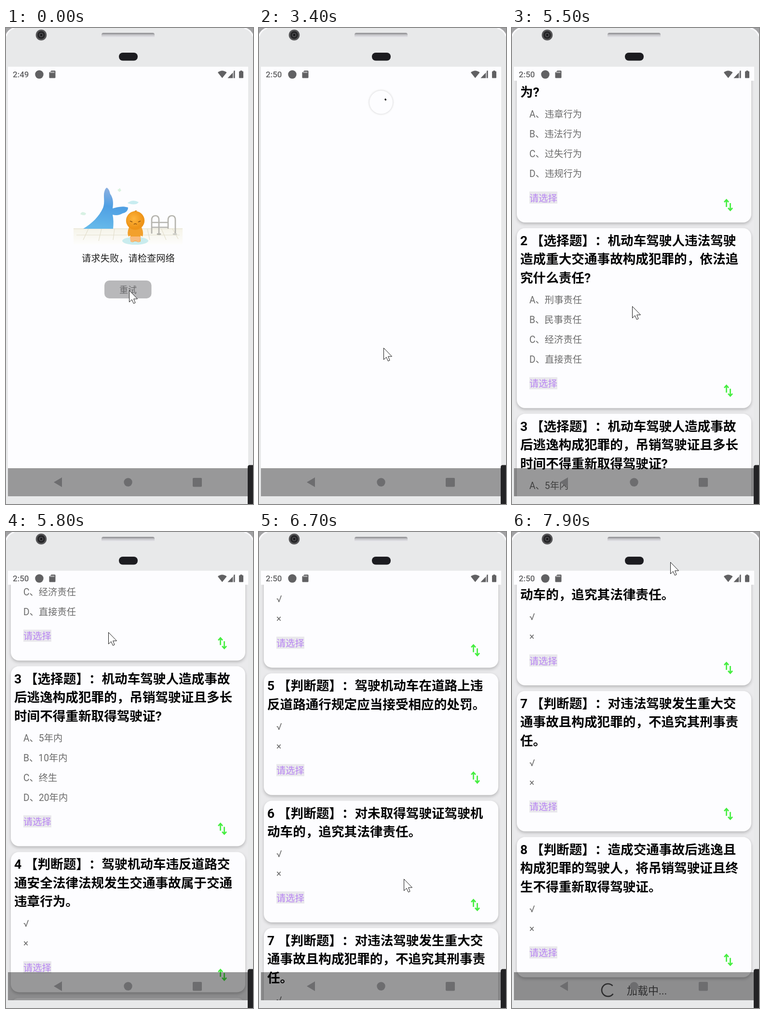
An HTML page that plays this animation: 512x984 px, repeating every 8000 ms.

```html
<!DOCTYPE html>
<html lang="zh-CN">
<head>
<meta charset="utf-8">
<title>答题列表</title>
<style>
html, body { margin: 0; width: 100%; height: 100%; overflow: hidden; background: #e8e9ea; }
svg { display: block; width: 100vw; height: 100vh; text-spacing-trim: space-all;
  font-family: Roboto, "Noto Sans CJK SC", "Noto Sans CJK", sans-serif; }
text { white-space: pre; }
.title { font-size: 26.6px; font-weight: 700; fill: #030304; }
.option { font-size: 19.3px; fill: #6b6b6b; }
.pick { font-size: 19.3px; fill: #b784f2; }
.card { fill: #fdfdff; filter: drop-shadow(0 3px 3px rgba(0, 0, 0, .22)); }
</style>
</head>
<body>
<svg id="stage" viewBox="0 0 512 984" preserveAspectRatio="none">
  <defs>
    <linearGradient id="speaker" x2="0" y2="1">
      <stop offset="0" stop-color="#858588"/><stop offset=".45" stop-color="#c6c6ca"/><stop offset="1" stop-color="#ececf0"/>
    </linearGradient>
    <linearGradient id="tail" x1=".6" x2=".45" y2="1">
      <stop offset="0" stop-color="#8fb0e0"/><stop offset=".45" stop-color="#4f9fe3"/><stop offset="1" stop-color="#65b9ea"/>
    </linearGradient>
    <radialGradient id="skin" cx=".42" cy=".4">
      <stop offset="0" stop-color="#ffb53c"/><stop offset="1" stop-color="#ee9418"/>
    </radialGradient>
    <linearGradient id="floor" x2="0" y2="1">
      <stop offset="0" stop-color="#f5f3e8"/><stop offset="1" stop-color="#fdfdfc"/>
    </linearGradient>
    <clipPath id="listClip"><rect x="4" y="109" width="498" height="859"/></clipPath>
  </defs>

  <rect width="512" height="984" fill="#e8e9ea"/>
  <path d="M0 0H17Q4 4 0 17ZM512 0H494Q508 4 512 17Z" fill="#a2a2a4"/>
  <path d="M0 17Q4 4 17 0M512 17Q508 4 494 0" fill="none" stroke="#f8f8fa" stroke-width="3"/>
  <circle cx="73" cy="14.500" r="11.300" fill="#555557"/>
  <circle cx="73" cy="14.500" r="8" fill="#252527"/>
  <circle cx="73" cy="14.500" r="4.500" fill="#48484b"/>
  <circle cx="73" cy="14.500" r="2.200" fill="#111113"/>
  <path d="M198 20V14Q198 10 202 10H304Q308 10 308 14V20Z" fill="url(#speaker)"/>
  <rect x="234" y="51" width="39" height="16.500" rx="8" fill="#1c1c20"/>
  <rect x="4" y="80" width="498" height="888" fill="#fdfdff"/>

  <g id="errorView">
    <rect x="140" y="414" width="226" height="33" fill="url(#floor)"/>
    <path d="M140 415H366M146 428H360M171 415L160 438M198 415L192 440M225 415L222 438M293 415L298 438M322 415L332 438M345 415L357 436" fill="none" stroke="#e3dfcd" stroke-width="1.200"/>
    <path d="M160 415C178 404 193 390 201 372C206 360 201 347 204 338Q206 331 209 330Q214 333 216 343C222 351 223 361 221 373C230 371 240 367 253 371C253 378 248 382 242 383C235 387 229 388 221 386C223 395 223 405 222 415Z" fill="url(#tail)"/>
    <path d="M252 362Q262 353 275 360Q270 368 252 362Z" fill="#c8ecf0"/>
    <path d="M231 335L236 331L239 336L235 339Z" fill="#d9f1df"/>
    <path d="M154 385Q157 377 166 383Q165 390 154 385Z" fill="#d8f1e4"/>
    <ellipse cx="268" cy="440" rx="27" ry="8" fill="#c9ecee"/>
    <path d="M302 425V397Q302 388 310 388Q317 388 317 397V426M336 415V397Q336 388 344 388Q351 388 351 397V426M302 402H336M302 412H336" fill="none" stroke="#b5b4ae" stroke-width="2.700"/>
    <ellipse cx="317" cy="426" rx="4.500" ry="2" fill="#b5b4ae"/>
    <ellipse cx="350" cy="426" rx="4.500" ry="2" fill="#cfcec8"/>
    <path d="M255 412Q250 424 254 431L258 429V441Q262 444 266 441H270Q275 444 279 441V429L283 431Q286 423 281 412Z" fill="#f2a02c"/>
    <path d="M257 431H279L278 441Q274 444 270 440H266Q262 444 258 441Z" fill="#f9bb7c"/>
    <path d="M265 381Q266 377 271 377L270 382Z" fill="#d77f12"/>
    <circle cx="268" cy="398" r="19.200" fill="url(#skin)"/>
    <path d="M257 399L262 401M274 401L279 399M265 406Q268 403 271 406" fill="none" stroke="#8c5210" stroke-width="1.500"/>
    <text x="253.500" y="482.500" text-anchor="middle" font-size="19.300" fill="#202020">请求失败，请检查网络</text>
    <rect x="204" y="522" width="97.500" height="37" rx="10" fill="#b8b8ba"/>
    <text x="253" y="547.500" text-anchor="middle" font-size="18" fill="#69696b">重试</text>
  </g>

  <g id="list" clip-path="url(#listClip)">
    <rect x="4" y="109" width="498" height="859" fill="#eaeaec"/>
    <g id="content"></g>
  </g>

  <g id="refresh">
    <circle r="27.500" fill="#f4f4f5" opacity=".65"/>
    <circle r="25.500" fill="#e9e9eb"/>
    <circle r="24" fill="#fdfdff"/>
    <path id="refreshArc" fill="none" stroke="#060607" stroke-width="3" stroke-linecap="square"/>
  </g>

  <rect x="4" y="80" width="498" height="29" fill="#fdfdff"/>
  <g fill="#616163">
    <text id="clock" x="14" y="102" font-size="17" font-weight="500"></text>
    <circle cx="69" cy="96" r="8.700"/>
    <path d="M94 88H101Q102.500 88 102.500 89.500V102Q102.500 103.500 101 103.500H91Q89.500 103.500 89.500 102V92.500Z"/>
    <path d="M439 92Q448 84.500 457.500 92L448.200 103.500Z"/>
    <path d="M459.500 103.500L474.500 88V103.500Z" opacity=".3"/>
    <path d="M459.500 103.500L470 92.500V103.500ZM472 88.500L474.500 88V103.500H472Z"/>
    <path d="M485.500 88H489.500V89.500H491Q492 89.500 492 90.500V102.500Q492 103.500 491 103.500H484Q483 103.500 483 102.500V90.500Q483 89.500 484 89.500H485.500Z"/>
    <path d="M93 90V93M96 90V93M99 90V93" stroke="#fdfdff" stroke-width="1.300"/>
  </g>

  <rect x="4" y="910" width="498" height="58" fill="#000" fill-opacity=".4"/>
  <g fill="#6d6d6f">
    <path d="M99 939L116 929V949Z"/>
    <circle cx="253" cy="939" r="8.700"/>
    <rect x="387" y="930" width="19" height="18.500" rx="2"/>
  </g>
  <path d="M512 903.500H505Q501 903.500 501 908V984H512Z" fill="#232325"/>
  <path id="cursor" d="M.5 .5V24.500L6 19.500L9.500 27.500L13 26L9.700 18H17.500Z" fill="#fff" stroke="#151516"/>
</svg>

<script>
const LOOP = 8000, STEP = 100, TURN = 1332;
const LINE = 38.5, ROW = 41, GAP = 11.8;
const $ = id => document.getElementById(id);
const clamp = v => Math.max(0, Math.min(1, v));

const judge = ['√', '×'];
const questions = [
  [['1 【选择题】：驾驶机动车在道路上违', '反道路交通安全法的行为，属于什么行', '为?'],
    ['A、违章行为', 'B、违法行为', 'C、过失行为', 'D、违规行为']],
  [['2 【选择题】：机动车驾驶人违法驾驶', '造成重大交通事故构成犯罪的，依法追', '究什么责任?'],
    ['A、刑事责任', 'B、民事责任', 'C、经济责任', 'D、直接责任']],
  [['3 【选择题】：机动车驾驶人造成事故', '后逃逸构成犯罪的，吊销驾驶证且多长', '时间不得重新取得驾驶证?'],
    ['A、5年内', 'B、10年内', 'C、终生', 'D、20年内']],
  [['4 【判断题】：驾驶机动车违反道路交', '通安全法律法规发生交通事故属于交通', '违章行为。'], judge],
  [['5 【判断题】：驾驶机动车在道路上违', '反道路通行规定应当接受相应的处罚。'], judge],
  [['6 【判断题】：对未取得驾驶证驾驶机', '动车的，追究其法律责任。'], judge],
  [['7 【判断题】：对违法驾驶发生重大交', '通事故且构成犯罪的，不追究其刑事责', '任。'], judge],
  [['8 【判断题】：造成交通事故后逃逸且', '构成犯罪的驾驶人，将吊销驾驶证且终', '生不得重新取得驾驶证。'], judge]
];

const label = (cls, x, y, s) => `<text class="${cls}" x="${x}" y="${y}">${s}</text>`;

function card([lines, options], top) {
  const height = 92.5 + LINE * lines.length + ROW * options.length;
  const first = 32.5 + LINE * lines.length;
  const pick = first + ROW * (options.length - 1) + 50.5;
  const svg = `<g transform="translate(0 ${top})">
    <rect class="card" x="10" width="486" height="${height}" rx="17"/>
    ${lines.map((s, i) => label('title', 17, 35 + LINE * i, s)).join('')}
    ${options.map((s, i) => label('option', 36, first + 7 + ROW * i, s)).join('')}
    <rect x="36" y="${pick - 13.5}" width="58" height="25" fill="#e9e8ec"/>
    ${label('pick', 36, pick + 7, '请选择')}
    <path transform="translate(448.5 ${height - 36})" fill="none" stroke="#45ee40" stroke-width="2.7"
      d="M-4 4V-10M-8.500 -6L-4 -11L.5 -6M4 -4V10M-.5 6L4 11L8.500 6"/>
  </g>`;
  return { svg, height };
}

function buildList() {
  let top = 116, html = '';
  for (const q of questions) {
    const c = card(q, top);
    html += c.svg;
    top += c.height + GAP;
  }
  html += `<path id="moreArc" transform="translate(199 2714)" fill="none" stroke="#4a4a4c" stroke-width="2.6"/>
    <text x="238" y="2723" font-size="22" fill="#4a4a4c">加载中...</text>`;
  $('content').innerHTML = html;
}

// Material easing: cubic-bezier(.4, 0, .2, 1)
function ease(x) {
  let lo = 0, hi = 1;
  for (let i = 0; i < 20; i++) {
    const m = (lo + hi) / 2, n = 1 - m;
    if (1.2 * n * n * m + .6 * n * m * m + m ** 3 < x) lo = m; else hi = m;
  }
  return lo * lo * (3 - 2 * lo);
}

function arc(r, from, sweep) {
  const point = deg => {
    const a = deg * Math.PI / 180;
    return `${(r * Math.cos(a)).toFixed(2)} ${(r * Math.sin(a)).toFixed(2)}`;
  };
  return `M${point(from)}A${r} ${r} 0 ${sweep > 180 ? 1 : 0} 1 ${point(from + sweep)}`;
}

// The arc grows for half a turn, then its tail catches up.
function ring(r, elapsed, base) {
  const n = Math.max(0, elapsed) / TURN, k = Math.floor(n), u = n - k;
  const grow = 284.4 * ease(clamp(u * 2));
  const shrink = 284.4 * ease(clamp(u * 2 - 1));
  return arc(r, base + 572.4 * k + 291.6 * u + shrink, grow - shrink + 3.6);
}

// Keys are [time, ...values].
function track(keys, t) {
  if (t <= keys[0][0]) return keys[0].slice(1);
  for (let i = 1; i < keys.length; i++) {
    const a = keys[i - 1], b = keys[i];
    if (t <= b[0]) {
      const u = (t - a[0]) / (b[0] - a[0]);
      return a.slice(1).map((v, j) => v + (b[j + 1] - v) * u);
    }
  }
  return keys[keys.length - 1].slice(1);
}

const pointer = [
  [2400, 255, 542], [2700, 264, 570], [3000, 267, 622], [3300, 258, 660], [3400, 258, 661],
  [5300, 258, 661], [5400, 256, 646], [5500, 249, 575], [5600, 236, 425], [5700, 221, 265],
  [5800, 212, 207], [6000, 214, 215], [6200, 240, 360], [6400, 274, 575], [6600, 297, 700], [6700, 300, 717],
  [7000, 300, 717], [7100, 302, 700], [7200, 306, 620], [7300, 313, 470], [7400, 320, 300],
  [7500, 325, 160], [7600, 328, 85], [7700, 328, 62]
];
const drag = [[5300, 0], [5400, 15], [5500, 86], [5600, 236], [5700, 425], [5800, 606]];
const pull = [[7000, 1277], [7100, 1294], [7200, 1374], [7300, 1524], [7400, 1690], [7500, 1767]];

function scrollAt(t) {
  if (t <= 5800) return track(drag, t)[0];
  if (t <= 7000) return 606 + 671 * (1 - (1 - clamp((t - 5800) / 900)) ** 2.3);
  return track(pull, t)[0];
}

function render(ms) {
  const t = Math.floor(ms % LOOP / STEP) * STEP;
  const loaded = t >= 4500;
  $('errorView').style.display = t < 700 ? '' : 'none';
  $('clock').textContent = t < 700 ? '2:49' : '2:50';

  const size = loaded ? clamp((4550 - t) / 150) : clamp((t - 650) / 150);
  $('refresh').style.display = size > 0 ? '' : 'none';
  $('refresh').setAttribute('transform', `translate(253 153.500) scale(${size})`);
  $('refreshArc').setAttribute('d', ring(10.8, Math.min(t, 4200) - 736, 262));

  $('list').style.display = loaded ? '' : 'none';
  $('content').setAttribute('transform', `translate(0 ${-scrollAt(t)})`);
  $('moreArc').setAttribute('d', ring(13, t - 6035, 67));

  const [x, y] = track(pointer, t);
  $('cursor').setAttribute('transform', `translate(${x} ${y})`);
}

buildList();
const begin = performance.now();
function tick() {
  render(performance.now() - begin);
  requestAnimationFrame(tick);
}
tick();
</script>
</body>
</html>
```
